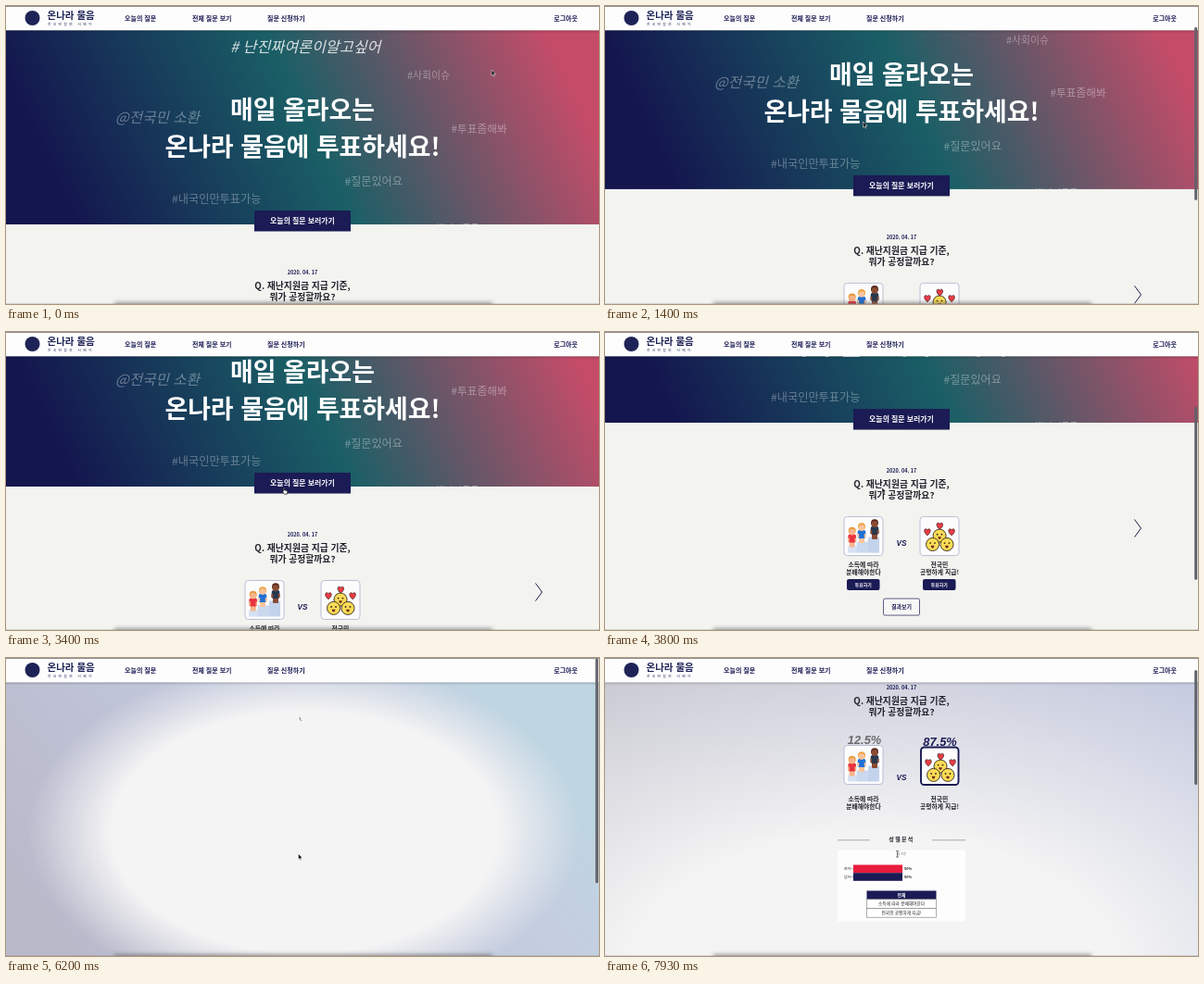
An HTML page for the animation above (8 s loop, 640 by 322 pixels).

```html
<!DOCTYPE html>
<html lang="ko">
<head>
<meta charset="utf-8">
<title>온나라 물음</title>
<style>
html, body { margin: 0; width: 640px; height: 322px; overflow: hidden; background: #f3f4f0; }
svg { display: block; font-family: 'Noto Sans CJK KR', 'Noto Sans KR', 'Noto Sans CJK', sans-serif; }
.latin { font-family: 'Liberation Sans', Arial, sans-serif; font-style: italic; font-weight: 700; }
</style>
</head>
<body>
<svg id="stage" width="640" height="322" viewBox="0 0 640 322"></svg>
<script>
const LOOP = 8000, NAVY = '#1b1b55', INK = '#22222c';
const stage = document.getElementById('stage');
const $ = id => document.getElementById(id);

// y is the optical middle of the line
const text = (x, y, size, str, fill = INK, weight = 700, extra = '', anchor = 'middle') =>
  `<text x="${x}" y="${y + size * 0.38}" font-size="${size}" fill="${fill}" font-weight="${weight}" text-anchor="${anchor}" ${extra}>${str}</text>`;
const left = (x, y, size, str, fill, weight, extra) => text(x, y, size, str, fill, weight, extra, 'start');
const right = (x, y, size, str, fill, weight) => text(x, y, size, str, fill, weight, '', 'end');
const rect = (x, y, w, h, fill, extra = '') =>
  `<rect x="${x}" y="${y}" width="${w}" height="${h}" fill="${fill}" ${extra}/>`;
const circle = (x, y, r, fill, extra = '') => `<circle cx="${x}" cy="${y}" r="${r}" fill="${fill}" ${extra}/>`;
const line = (x1, y1, x2, y2, color, w = 0.7) =>
  `<path d="M${x1} ${y1}L${x2} ${y2}" stroke="${color}" stroke-width="${w}"/>`;

const person = (x, y, skin, hair, shirt) =>
  rect(x - 3, y + 10, 6, 7, skin, 'rx="1"') +
  rect(x - 4.3, y + 3, 8.6, 9, shirt, 'rx="2"') +
  rect(x - 4.6, y + 7, 1.8, 4, skin) + rect(x + 2.8, y + 7, 1.8, 4, skin) +
  circle(x, y - 0.8, 4, hair) + circle(x, y + 0.6, 3.3, skin);

const podium =
  rect(4, 32, 10, 7, '#d6e1f3') + rect(13.5, 27, 13, 12, '#cbd9ef') + rect(26, 22, 12, 17, '#c3d3ec') +
  person(8.7, 16, '#f6b48c', '#e79a3c', '#e8333f') +
  person(19, 11.5, '#f9c49c', '#f0a23e', '#1f6fd6') +
  person(33, 7.5, '#8a4b32', '#5a2c20', '#27384f');

const face = (x, y) =>
  circle(x, y, 7.5, '#fbdc55', 'stroke="#3a2b20" stroke-width="1"') +
  circle(x - 2.6, y - 1.5, 1, '#3a2b20') + circle(x + 2.6, y - 1.5, 1, '#3a2b20') +
  `<path d="M${x - 2} ${y + 1.3}h4q-.4 3.2-2 3.2t-2-3.2z" fill="#6b2a20"/>`;
const heart = (x, y) =>
  `<path transform="translate(${x} ${y})" d="M0 4.2C-6-.5-3-5.5 0-2.3 3-5.5 6-.5 0 4.2z" fill="#ee3b45" stroke="#3a2020" stroke-width=".8"/>`;
const faces = `<g transform="translate(1.4 1.4) scale(.935)">${heart(7, 16) + heart(21.3, 9) + heart(35, 16) +
  face(21, 20.5) + face(13, 30.5) + face(29.5, 30.5)}</g>`;

const card = (x, y, art, border = '#b4b8d0', w = 0.9, size = 42) =>
  `<g transform="translate(${x} ${y})">${rect(0, 0, size, size, '#fcfcfd', `rx="3.5" stroke="${border}" stroke-width="${w}"`)}${art}</g>`;

const question = y =>
  text(320, y, 5.5, '2020. 04. 17', NAVY) +
  text(320, y + 14.3, 9.8, 'Q. 재난지원금 지급 기준,') +
  text(320, y + 26.3, 9.8, '뭐가 공정할까요?');
const versus = y => text(320, y, 8.2, 'VS', NAVY, 700, 'class="latin"');
const labels = y =>
  text(279, y, 6.8, '소득에 따라') + text(279, y + 8.7, 6.8, '분배해야한다') +
  text(361, y, 6.8, '전국민') + text(361, y + 8.7, 6.8, '공평하게 지급!');
const brand = (x, y, color) =>
  circle(x - 16, y + 3, 8, color) +
  left(x, y, 10.5, '온나라 물음', color) +
  left(x + 0.5, y + 10, 3.6, '전국민참여 서베이', color, 400, 'letter-spacing="2.5"');

const tag = (x, y, size, str, opacity, slant = false) =>
  left(x, y + 0.6, size, str, '#fff', 300, `opacity="${opacity}"${slant ? ' font-style="italic"' : ''}`);

const hero = `<g clip-path="url(#heroBox)">${rect(0, 26, 640, 210, 'url(#heroFill)')}` +
  tag(242, 43, 16.2, '# 난진짜여론이알고싶어', 0.82, true) +
  tag(433, 74, 10.9, '#사회이슈', 0.36) +
  tag(118, 119.5, 15.6, '@전국민 소환', 0.36, true) +
  tag(480.5, 131.5, 11.7, '#투표좀해봐', 0.38) +
  tag(365.5, 189, 12.1, '#질문있어요', 0.36) +
  tag(179, 208, 12.2, '#내국인만투표가능', 0.34) +
  tag(459, 239.5, 10, '#별난질문들', 0.55) +
  text(320, 111.5, 26.9, '매일 올라오는', '#fff') +
  text(320, 151.5, 26.9, '온나라 물음에 투표하세요!', '#fff') + '</g>' +
  rect(268, 221, 104, 22.5, NAVY) + text(320, 232.3, 7.9, '오늘의 질문 보러가기', '#fff');

const voteButton = x => rect(x, 405, 35.5, 12, NAVY, 'rx="2"') + text(x + 17.8, 411, 4.9, '투표하기', '#fff');

const footer = rect(0, 476, 640, 80, '#1b1f28') + brand(87, 496.5, '#fff') +
  left(466, 498, 7, '회사소개', '#fff') + left(513, 498, 7, '서비스 약관', '#fff') +
  right(619, 498, 7, '개인정보취급방침', '#3a8be0') +
  right(619, 532.5, 4.3, '(주) 바람연구소', '#8b8e95', 400) +
  right(619, 541, 4.3, 'contact.peoplepolls@example.com', '#8b8e95', 400) +
  left(62, 545, 4.1, '© 2020 Q-HUB All Rights Reserved.', '#8b8e95', 400);

const home = hero + question(288.3) + card(258, 337.5, podium) + card(340, 337.5, faces) +
  versus(366) + labels(389) + voteButton(261) + voteButton(343) +
  rect(300.5, 426, 39, 18, '#f7f7f6', `rx="1.5" stroke="${NAVY}" stroke-width=".7"`) +
  text(320, 435, 6, '결과보기', NAVY) +
  '<path d="M571.5 340.5l7 9.5-7 9.5" fill="none" stroke="#1b1b45" stroke-width="1"/>' + footer;

const row = (y, str) => rect(282.5, y, 75, 9.7, '#fff', 'stroke="#777" stroke-width=".6"') + text(320, y + 4.8, 4.7, str, INK, 400);
const results = question(64) +
  text(280, 121, 12.8, '12.5%', '#6a6a6e', 700, 'class="latin"') +
  text(361.5, 122.3, 12.8, '87.5%', NAVY, 700, 'class="latin"') +
  card(258, 127, podium) + card(341, 129, faces, NAVY, 1.9, 40.5) +
  versus(161.5) + labels(184.7) +
  line(251, 229.3, 286, 229.3, '#888') + line(353, 229.3, 389, 229.3, '#888') +
  text(320, 228.5, 6, '성별분석', INK, 700, 'letter-spacing="1.3"') +
  rect(251, 240, 138, 77, '#fdfdfd') + text(320, 243.7, 3.6, '총 8명', '#777', 400) +
  rect(268, 256, 53, 8.7, '#e81c3e') + rect(268, 264.7, 53, 8.6, NAVY) +
  right(265, 260.3, 3.8, '여자', INK, 400) + right(265, 269, 3.8, '남자', INK, 400) +
  line(265.5, 260.3, 268, 260.3, '#555', 0.5) + line(265.5, 269, 268, 269, '#555', 0.5) +
  left(323, 260.3, 3.8, '50%') + left(323, 269, 3.8, '50%') +
  rect(282.5, 284, 75, 9.3, NAVY) + text(320, 288.6, 4.8, '전체', '#fff') +
  row(293.3, '소득에 따라 분배해야한다') + row(303, '전국민 공평하게 지급!');

const nav = rect(0, 26, 640, 3.5, 'url(#navShade)') + rect(0, 0, 640, 26.3, '#fdfdfd') + rect(0, 0, 640, 0.8, '#777') +
  brand(44.5, 10, '#1d2356') +
  left(128, 13, 7, '오늘의 질문', NAVY) + left(201, 13, 7, '전체 질문 보기', NAVY) +
  left(282, 13, 7, '질문 신청하기', NAVY) + right(617, 13, 7, '로그아웃', NAVY);

const stops = list => list.map(([at, color, alpha = 1]) =>
  `<stop offset="${at}" stop-color="${color}" stop-opacity="${alpha}"/>`).join('');

stage.innerHTML = `<defs>
  <clipPath id="heroBox"><rect y="26" width="640" height="210"/></clipPath>
  <linearGradient id="heroFill" gradientUnits="userSpaceOnUse" x1="17" y1="272" x2="623" y2="-10">
    ${stops([[0.1, '#14164e'], [0.51, '#1a5f66'], [0.92, '#c44c69']])}</linearGradient>
  <linearGradient id="mist" x1="0" y1=".7" x2="1" y2=".3">
    ${stops([[0, '#b9b9ca'], [0.5, '#c2c8dc'], [0.75, '#c4cfe0'], [0.9, '#bfd5e2']])}</linearGradient>
  <linearGradient id="mistLate">${stops([[0, '#c6c6d0'], [1, '#c3c9df']])}</linearGradient>
  <radialGradient id="glow">${stops([[0, '#f4f4f4'], [0.7, '#f4f4f4'], [0.85, '#f2f2f3', 0.5], [1, '#f0f0f2', 0]])}</radialGradient>
  <radialGradient id="glowWide">${stops([[0, '#f4f4f4'], [0.4, '#f4f4f4'], [1, '#f0f0f2', 0]])}</radialGradient>
  <linearGradient id="navShade" x2="0" y2="1">${stops([[0, '#000', 0.2], [1, '#000', 0]])}</linearGradient>
  <filter id="soft" x="-5%" y="-200%" width="110%" height="500%"><feGaussianBlur stdDeviation="2.2"/></filter>
</defs>
${rect(0, 0, 640, 322, '#f3f4f0')}
<g id="home">${home}</g>
<g id="backdrop">${rect(0, 0, 640, 322, 'url(#mist)')}
  <ellipse id="oval" fill="url(#glow)"/>
  <g id="late">${rect(0, 0, 640, 322, 'url(#mistLate)')}<ellipse id="ovalWide" fill="url(#glowWide)"/></g></g>
<path id="spinner" d="M317 64q0 2.5 2 4" fill="none" stroke="#555" stroke-width=".8"/>
<g id="results">${results}</g>
${nav}
${rect(117, 320, 408, 5, '#555', 'opacity=".55" filter="url(#soft)"')}
${rect(0, 321.3, 640, 0.7, '#888', 'opacity=".4"')}
<rect id="bar" x="636.2" width="3" rx="1.5" fill="#62626a"/>
<g id="cursor">
  <path id="arrow" d="M0 0v6.2l1.5-1.3 1 2.2 1-.5-1-2.1h1.9z" fill="#111" stroke="#fff" stroke-width=".5"/>
  <path id="hand" d="M.4.8q.7-1 1.2 0v2.1l2.6.6q.8.3.6 1.3l-.6 2.4H1.4L-.6 4.6q-.1-1 1 -.4z" fill="#fff" stroke="#111" stroke-width=".7"/>
  <path id="beam" d="M-1.4-3.2q1.4 0 1.4 1v5q0 1-1.4 1M1.4-3.2q-1.4 0-1.4 1m0 5q0 1 1.4 1" fill="none" stroke="#333" stroke-width=".7"/>
</g>`;

const clamp = v => Math.min(1, Math.max(0, v));
const ease = p => p * p * (3 - 2 * p);
const span = (t, a, b) => ease(clamp((t - a) / (b - a)));
const mix = (a, b, p) => a + (b - a) * p;

// keys: [time, ...values]
function track(keys, t) {
  let i = keys.length - 1;
  while (i > 0 && keys[i][0] > t) i--;
  const a = keys[i], b = keys[i + 1] || a;
  const p = a === b ? 0 : span(t, a[0], b[0]);
  return a.slice(1).map((v, k) => mix(v, b[k + 1], p));
}

const PATH = [[0, 524, 69], [70, 524, 69], [530, 278.5, 125], [1950, 278.5, 125], [2700, 299, 168],
  [4050, 299, 168], [4550, 288, 187], [4950, 288, 187], [5300, 315.5, 211.5]];
const HOME_SCROLL = [[0, 0], [1000, 0], [1750, 69], [3500, 69], [4150, 224]];
const RESULT_SCROLL = [[0, 0], [7150, 0], [7850, 32.5]];
const LOAD = 5650, READY = 6500;

const show = (id, on) => $(id).setAttribute('visibility', on ? 'visible' : 'hidden');
function setOval(id, cx, cy, rx, ry) {
  Object.entries({ cx, cy, rx, ry }).forEach(([k, v]) => $(id).setAttribute(k, v));
}
const pulse = (t, a, b) => clamp((t - a) / 100) * clamp((b + 350 - t) / 250);

function draw(t) {
  const loading = t >= LOAD, ready = t >= READY;
  const [scroll] = track(loading ? RESULT_SCROLL : HOME_SCROLL, t);
  show('home', !loading);
  show('backdrop', loading);
  show('spinner', loading && !ready);
  show('results', ready);
  $(loading ? 'results' : 'home').setAttribute('transform', `translate(0 ${-scroll})`);
  $('spinner').setAttribute('transform', `rotate(${(t - 6200) * 0.36} 320 65)`);

  const grow = span(t, 6250, 6900);
  const oval = [mix(322, 290, grow), mix(188, 345, grow), mix(298, 660, grow), mix(186, 385, grow)];
  setOval('oval', ...oval);
  setOval('ovalWide', ...oval);
  $('late').setAttribute('opacity', grow);

  const height = !loading ? 554 : ready ? 836 : 427;
  $('bar').setAttribute('y', scroll / height * 322 + 0.5);
  $('bar').setAttribute('height', 322 * 322 / height);
  $('bar').setAttribute('opacity', Math.max(pulse(t, 1000, 1750), pulse(t, 3500, 4150),
    pulse(t, LOAD, READY), pulse(t, 7150, 7900)));

  const [x, y] = track(PATH, t);
  $('cursor').setAttribute('transform', `translate(${x} ${y})`);
  const hand = (t > 2550 && t < 3650) || (t > 4450 && t < 5020) || (t > 5200 && t < LOAD);
  const beam = t > 7780;
  show('hand', hand);
  show('beam', beam);
  show('arrow', !hand && !beam);
}

const start = performance.now();
function frame() {
  draw((performance.now() - start) % LOOP);
  requestAnimationFrame(frame);
}
frame();
</script>
</body>
</html>
```
